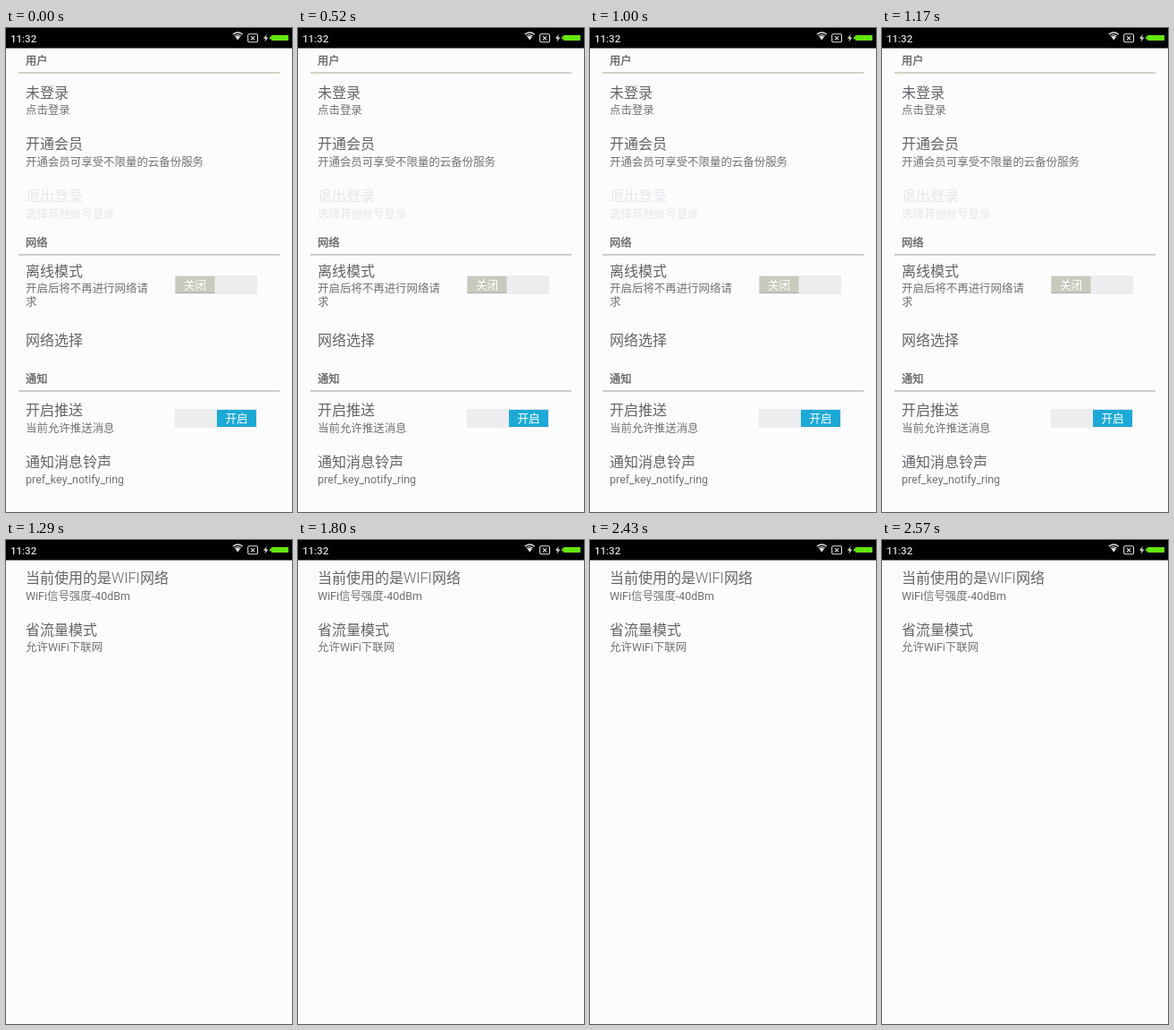
An HTML page for the animation above (2710 ms loop, 320 px wide and 540 px high).

```html
<!DOCTYPE html>
<html lang="zh-CN">
<head>
<meta charset="utf-8">
<style>
html, body { margin: 0; width: 100%; height: 100%; overflow: hidden; background: #fcfcfd; }
svg { display: block; width: 100vw; height: 100vh; }
text { font-family: Roboto, "Noto Sans CJK SC", "Noto Sans CJK", sans-serif; font-kerning: none; }
.title { font-size: 16px; font-weight: 300; fill: #646468; }
.sub { font-size: 12.45px; fill: #727275; }
.head { font-size: 12.2px; fill: #626264; stroke: #626264; stroke-width: .3px; }
.off { fill: #e7e7ec; }
.switch { font-size: 12.6px; fill: #fff; text-anchor: middle; }
.clock { font-size: 11.5px; font-weight: 500; fill: #dcdcdc; }
</style>
</head>
<body>
<svg viewBox="0 0 320 540" preserveAspectRatio="none">
  <rect width="320" height="540" fill="#fcfcfd"/>
  <g id="settings"></g>
  <g id="network"></g>
  <g id="status">
    <rect width="320" height="22"/>
    <rect y="22" width="320" height="1" fill="#77757a"/>
    <text class="clock" x="5" y="16">11:32</text>
    <g fill="none" stroke="#e0e0e0" stroke-width="1.3">
      <path d="M253.8 7.2Q259.3 2.8 264.8 7.2"/>
      <path d="M255.4 8.6Q259.3 5.6 263.2 8.6L259.3 13.4Z" fill="#e0e0e0" stroke="none"/>
      <path d="M255.8 9.6Q259.3 6.9 262.8 9.6" stroke="#000" stroke-width=".7"/>
      <rect x="270.7" y="6.7" width="10.8" height="9" rx="1.5" stroke-width="1.1"/>
      <path d="M274 9.2L278.2 13.4M278.2 9.2L274 13.4" stroke-width="1.1"/>
    </g>
    <path d="M291.6 7L288 11.8H290.5L289.6 15.4L293.4 10.5H290.9Z" fill="#e0e0e0"/>
    <rect x="295" y="9.5" width="2" height="3" fill="#62d914"/>
    <rect x="297" y="8" width="19" height="6" fill="#62e60f"/>
  </g>
</svg>
<script>
const LOOP = 2710, PRESS = 860, RELEASE = 1000, OPEN = 1290;
const NS = "http://www.w3.org/2000/svg";
const settings = document.getElementById("settings");
const network = document.getElementById("network");

function add(parent, tag, attrs, content) {
  const el = document.createElementNS(NS, tag);
  for (const key in attrs) el.setAttribute(key, attrs[key]);
  if (content) el.textContent = content;
  parent.append(el);
  return el;
}

const rect = (parent, x, y, width, height, fill) =>
  add(parent, "rect", { x, y, width, height, fill });
const label = (parent, kind, y, words, x = 22) =>
  add(parent, "text", { class: kind, x, y }, words);

function item(parent, y, title, lines = [], off = "") {
  const el = label(parent, "title " + off, y, title);
  lines.forEach((line, i) => label(parent, "sub " + off, y + 18.5 + i * 14.5, line));
  return el;
}

function header(y, words, color) {
  label(settings, "head", y, words);
  rect(settings, 14, y + 8, 292, 2, color);
}

function toggle(y, thumbX, color, edge, words) {
  rect(settings, 189, y, 92, 21, "#ededef");
  rect(settings, thumbX, y + 1, 44, 19, color);
  rect(settings, thumbX, y + 19, 44, 1, edge);
  label(settings, "switch", y + 15, words, thumbX + 22);
}

const pressed = rect(settings, 15, 319, 291, 57, "#f7f7f6");

[108, 166, 318, 462].forEach(y => rect(settings, 15, y, 291, 1, "#f7f7fa"));
header(41, "用户", "#d2d2c6");
item(settings, 77.5, "未登录", ["点击登录"]);
item(settings, 135, "开通会员", ["开通会员可享受不限量的云备份服务"]);
item(settings, 193, "退出登录", ["选择其他账号登录"], "off");
header(244, "网络", "#cecec6");
item(settings, 276.5, "离线模式", ["开启后将不再进行网络请", "求"]);
toggle(276, 189.5, "#c9c9be", "#aeaea3", "关闭");
const choice = item(settings, 353.5, "网络选择");
header(396, "通知", "#cccccb");
item(settings, 432, "开启推送", ["当前允许推送消息"]);
toggle(425, 236, "#1ca9d6", "#1aa2ce", "开启");
item(settings, 489.5, "通知消息铃声", ["pref_key_notify_ring"]);

item(network, 48, "当前使用的是WIFI网络", ["WiFi信号强度-40dBm"]);
item(network, 105.5, "省流量模式", ["允许WiFi下联网"]);
[79, 137].forEach(y => rect(network, 15, y, 291, 1, "#f7f7fb"));

function draw(t) {
  const down = t >= PRESS && t < RELEASE;
  settings.style.display = t < OPEN ? "" : "none";
  network.style.display = t < OPEN ? "none" : "";
  pressed.style.display = down ? "" : "none";
  choice.style.fill = down ? "#48484a" : "";
}

const start = performance.now();
function tick() {
  draw((performance.now() - start) % LOOP);
  requestAnimationFrame(tick);
}
tick();
</script>
</body>
</html>
```
